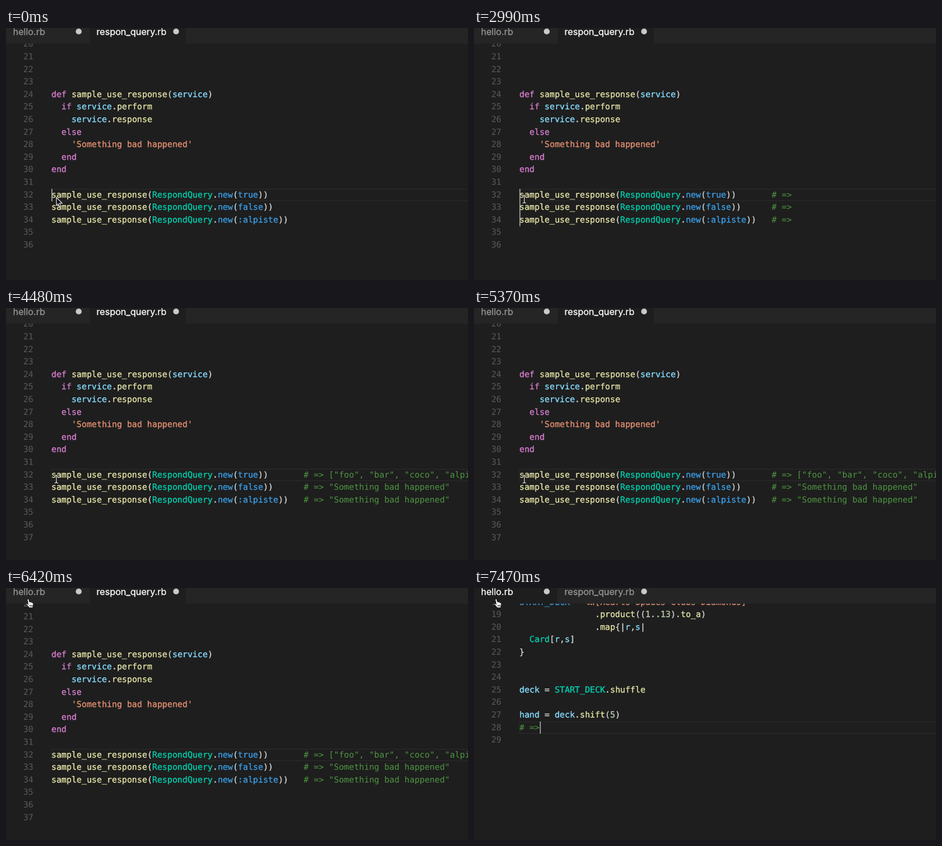
These frames come from a looping animation (794x434 px, 8 s). An HTML page:

```html
<!DOCTYPE html>
<html lang="en">
<head>
<meta charset="utf-8">
<title>Code editor</title>
<style>
  html, body { margin: 0; width: 100%; height: 100%; overflow: hidden; background: #1e1e1e; }
  svg { display: block; width: 794px; height: 434px; }
  text { white-space: pre; text-rendering: geometricPrecision; }
  .code text { font: 14.4px "DejaVu Sans Mono", Menlo, monospace; }
  .code tspan { stroke-width: .35; }
  .tabs text { font: 15.6px Inter, sans-serif; stroke-width: .3; }
  .num { fill: #5a5a5a; text-anchor: end; }
  .p { fill: #d4d4d4; stroke: #d4d4d4; }
  .k { fill: #d67dcd; stroke: #d67dcd; }
  .f { fill: #e4e3a6; stroke: #e4e3a6; }
  .v { fill: #86dcff; stroke: #86dcff; }
  .s { fill: #e29072; stroke: #e29072; }
  .c { fill: #00d0ae; stroke: #00d0ae; }
  .b { fill: #3a9ce4; stroke: #3a9ce4; }
  .n { fill: #b5cea8; stroke: #b5cea8; }
  .g { fill: #4d9640; }
  .on { fill: #fff; stroke: #fff; }
  .off { fill: #969696; stroke: #969696; }
</style>
</head>
<body>
<svg viewBox="0 0 794 434">
  <rect width="794" height="434" fill="#1e1e1e"/>
  <g id="query" class="code"></g>
  <g id="hello" class="code"></g>
  <g id="carets" fill="#bcbcbc"></g>
  <g class="tabs">
    <rect width="794" height="27" fill="#252526"/>
    <rect id="activeTab" height="27" fill="#1e1e1e"/>
    <text id="name0" x="12" y="12">hello.rb</text>
    <text id="name1" x="155.5" y="12">respon_query.rb</text>
    <circle cx="125" cy="6" r="5.1" fill="#c9c9c9"/>
    <circle cx="292.3" cy="6" r="5" fill="#c9c9c9"/>
  </g>
  <path id="arrow" transform="translate(86 291)" fill="#111" stroke="#eee" stroke-width="1.1"
    d="M.6.8V14.6L3.8 11.6L6 16.8L8.4 15.8L6.2 10.8H10.5Z"/>
  <g id="beam" transform="translate(86.5 294.5)" fill="none">
    <path stroke="#111" stroke-width="3" d="M-3-7Q0-7 0-5Q0-7 3-7M0-5V5M-3 7Q0 7 0 5Q0 7 3 7"/>
    <path stroke="#eee" stroke-width="1.2" d="M-3-7Q0-7 0-5Q0-7 3-7M0-5V5M-3 7Q0 7 0 5Q0 7 3 7"/>
  </g>
  <g id="hand" stroke="#111" stroke-linejoin="round">
    <path fill="#fff" d="M4.2 10.5L2.6 2.4Q2.8.6 4.2.8Q5 1 5.4 2.6L6.4 6.3Q7.6 5.2 8.5 6.6
      Q9.8 5.7 10.6 7.2Q12.4 6.6 12.8 8.8Q13.6 11.5 12.3 13.8L12 16H5.8Q4.8 13.8 1.2 10.6
      Q.3 9.3 1.6 8.8Q2.9 8.8 4.2 10.5Z"/>
    <path fill="none" stroke-width=".9" d="M7 11V14M9 11V14M11 11V14"/>
  </g>
</svg>
<script>
const LOOP = 8000, LEFT = 78, CHAR = 8.67, ROW = 21.6;
const $ = id => document.getElementById(id);

function add(parent, tag, attrs, content = '') {
  const el = document.createElementNS('http://www.w3.org/2000/svg', tag);
  for (const key in attrs) el.setAttribute(key, attrs[key]);
  el.textContent = content;
  return parent.appendChild(el);
}

const show = (el, on) => el.setAttribute('visibility', on ? 'visible' : 'hidden');

// Code is marked as "~" + colour class + text.
function addCode(parent, y, source, col = 0) {
  const line = add(parent, 'text', { x: LEFT + col * CHAR, y });
  for (const part of source.split('~').slice(1))
    add(line, 'tspan', { class: part[0] }, part.slice(1));
}

// Lays out a file so that the current line's row starts at top.
function addPage(parent, first, last, current, top, lines) {
  const baseline = n => Math.floor(top + 15 + (n - current) * ROW);
  add(parent, 'rect', { x: LEFT, y: top + .5, width: 730, height: 20,
    fill: 'none', stroke: '#2b2b2b' });
  for (let n = first; n <= last; n++)
    add(parent, 'text', { class: 'num', x: 47, y: baseline(n) }, n);
  for (const n in lines) addCode(parent, baseline(n), lines[n]);
  return baseline;
}

const call = arg => `~fsample_use_response~p(~cRespondQuery~p.~bnew~p(~b${arg}~p))`;
const rowY = addPage($('query'), 20, 36, 32, 277, {
  24: '~kdef~p ~fsample_use_response~p(~vservice~p)',
  25: '~p  ~kif~p ~vservice~p.~fperform',
  26: '~p    ~vservice~p.~fresponse',
  27: '~p  ~kelse',
  28: "~p    ~s'Something bad happened'",
  29: '~p  ~kend',
  30: '~kend',
  32: call('true'),
  33: call('false'),
  34: call(':alpiste')
});

const indent = '~p' + ' '.repeat(15);
addPage($('hello'), 18, 29, 28, 230, {
  18: '~bSTART_DECK~p = ~s%w[Hearts Spades Clubs Diamonds]',
  19: indent + '.~fproduct~p((~n1~p..~n13~p).~fto_a~p)',
  20: indent + '.~fmap~p{|~vr~p,~vs~p|',
  21: '~p  ~cCard~p[~vr~p,~vs~p]',
  22: '~p}',
  25: '~vdeck~p = ~cSTART_DECK~p.~fshuffle',
  27: '~vhand~p = ~vdeck~p.~fshift~p(~n5~p)',
  28: '~g# =>'
});

const marks = add($('query'), 'g', {});
const results = add($('query'), 'g', {});
const bad = '"Something bad happened"';
['["foo", "bar", "coco", "alpiste"]', bad, bad].forEach((value, i) => {
  addCode(marks, rowY(32 + i), '~g# =>', 50);
  addCode(results, rowY(32 + i), '~g' + value, 55);
});
add(results, 'text', { class: 'num', x: 47, y: rowY(37) }, 37);

const carets = [0, 1, 2].map(i => add($('carets'), 'rect',
  { x: LEFT + .2, y: 277 + i * 21.5, width: 1.4, height: 21.5 }));
const helloCaret = add($('carets'), 'rect', { x: 113.2, y: 230, width: 1.4, height: 21 });

const blinks = [300, 750, 1500, 1950, 2390, 2990, 3440, 3880, 4480, 4920,
  5370, 5970, 6420, 6570, 7020, 7470];

function draw(t) {
  const hello = t >= 6570;
  const caretOn = blinks.filter(b => b <= t).length % 2 === 0;
  const rows = t < 750 ? 1 : t < 900 ? 2 : 3;

  $('query').style.display = hello ? 'none' : '';
  $('hello').style.display = hello ? '' : 'none';
  show(marks, t >= 2390);
  show(results, t >= 4030);
  carets.forEach((caret, i) => show(caret, caretOn && !hello && i < rows));
  show(helloCaret, caretOn && hello);

  $('activeTab').setAttribute('x', hello ? 0 : 144);
  $('activeTab').setAttribute('width', hello ? 143 : 165);
  $('name0').setAttribute('class', hello ? 'on' : 'off');
  $('name1').setAttribute('class', hello ? 'off' : 'on');

  show($('arrow'), t < 750);
  show($('beam'), t >= 750 && t < 5520);
  show($('hand'), t >= 5970);
  const [x, y] = t < 6120 ? [-1, 7] : t < 6270 ? [13, 9] : [34, 18];
  $('hand').setAttribute('transform', `translate(${x} ${y})`);
}

const start = performance.now();
function tick() {
  draw((performance.now() - start) % LOOP);
  requestAnimationFrame(tick);
}
tick();
</script>
</body>
</html>
```
